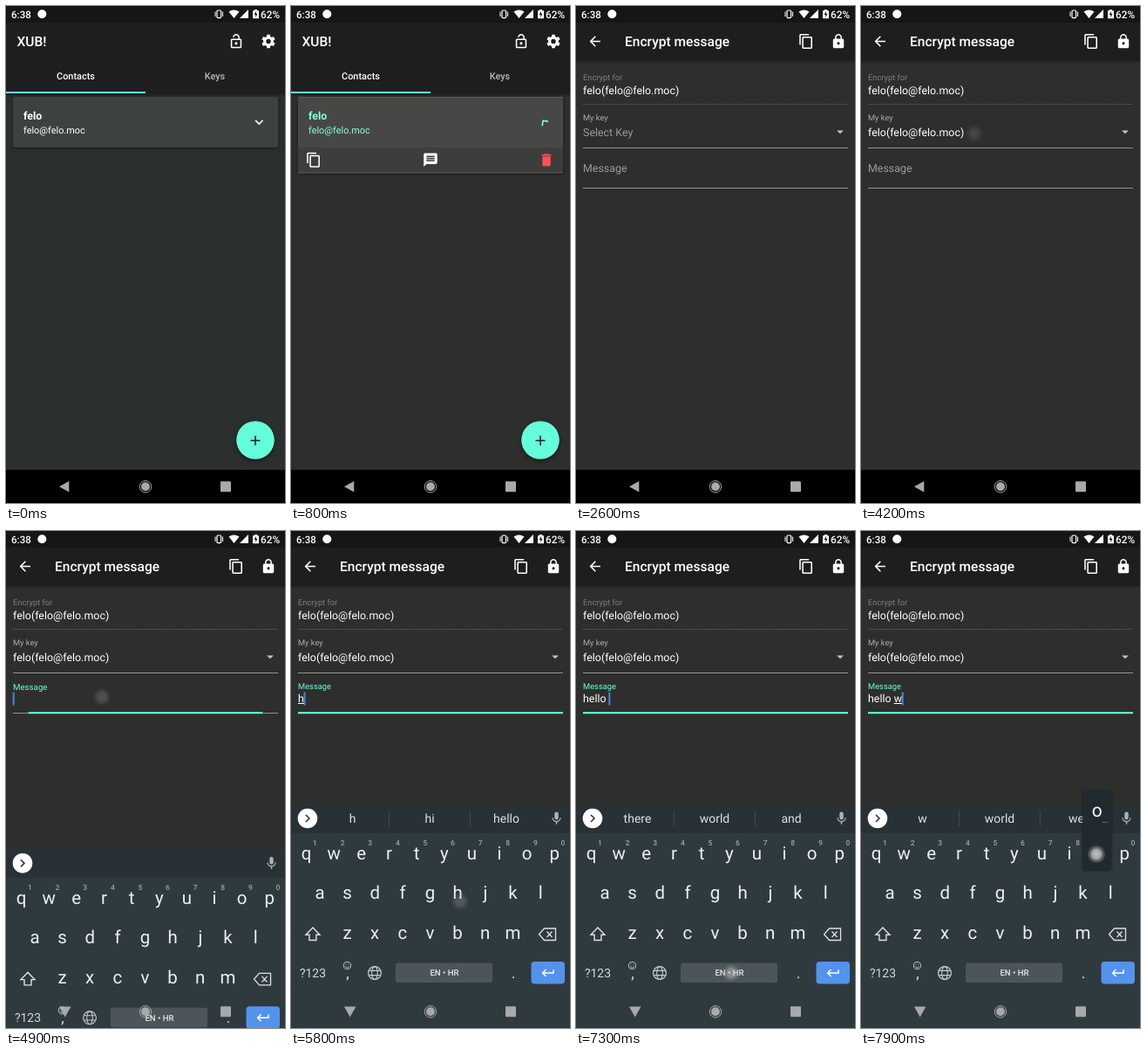
Recreate the animation shown at these times as an HTML page. Size 320x569 px, loop 8 s.

```html
<!DOCTYPE html>
<html lang="en">
<head>
<meta charset="utf-8">
<title>Encrypt message</title>
<style>
  html, body { margin: 0; width: 100%; height: 100%; overflow: hidden; background: #000; }
  svg { display: block; width: 100%; height: 100%; --bg: #2e2f2c; --card: #3d3e3c; --bar: #1e1f1c; }
  text { font-family: Roboto, "Noto Sans", sans-serif; white-space: pre; text-rendering: geometricPrecision; }
  .bg { fill: var(--bg); }
  .bar { fill: var(--bar); }
  .lift { filter: drop-shadow(0 1px 1.5px rgba(0, 0, 0, .5)); }
</style>
</head>
<body>
<svg id="stage" viewBox="0 0 320 569"></svg>
<script>
const ACCENT = '#64ffda', WHITE = '#fff', KEYS_BG = '#2f3a3f';
const NAME = 'felo', MAIL = 'felo@felo.moc', CONTACT = `${NAME}(${MAIL})`;
const LOOP = 8000;

const ICON = {
  copy: 'M16 1H4c-1.1 0-2 .9-2 2v14h2V3h12V1zm3 4H8c-1.1 0-2 .9-2 2v14c0 1.1.9 2 2 2h11c1.1 0 2-.9 2-2V7c0-1.1-.9-2-2-2zm0 16H8V7h11v14z',
  unlocked: 'M12 17c1.1 0 2-.9 2-2s-.9-2-2-2-2 .9-2 2 .9 2 2 2zm6-9h-1V6c0-2.76-2.24-5-5-5S7 3.24 7 6h1.9c0-1.71 1.39-3.1 3.1-3.1s3.1 1.39 3.1 3.1v2H6c-1.1 0-2 .9-2 2v10c0 1.1.9 2 2 2h12c1.1 0 2-.9 2-2V10c0-1.1-.9-2-2-2zm0 12H6V10h12v10z',
  locked: 'M18 8h-1V6c0-2.76-2.24-5-5-5S7 3.24 7 6v2H6c-1.1 0-2 .9-2 2v10c0 1.1.9 2 2 2h12c1.1 0 2-.9 2-2V10c0-1.1-.9-2-2-2zm-6 9c-1.1 0-2-.9-2-2s.9-2 2-2 2 .9 2 2-.9 2-2 2zm3.1-9H8.9V6c0-1.71 1.39-3.1 3.1-3.1s3.1 1.39 3.1 3.1v2z',
  message: 'M20 2H4c-1.1 0-2 .9-2 2v18l4-4h14c1.1 0 2-.9 2-2V4c0-1.1-.9-2-2-2zm-2 12H6v-2h12v2zm0-3H6V9h12v2zm0-3H6V6h12v2z',
  trash: 'M6 19c0 1.1.9 2 2 2h8c1.1 0 2-.9 2-2V7H6v12zM19 4h-3.5l-1-1h-5l-1 1H5v2h14V4z',
  back: 'M20 11H7.83l5.59-5.59L12 4l-8 8 8 8 1.41-1.41L7.83 13H20v-2z',
  drop: 'M7 10l5 5 5-5z',
  mic: 'M12 14c1.66 0 3-1.34 3-3V5c0-1.66-1.34-3-3-3S9 3.34 9 5v6c0 1.66 1.34 3 3 3zm5.3-3c0 3-2.54 5.1-5.3 5.1S6.7 14 6.7 11H5c0 3.41 2.72 6.23 6 6.72V21h2v-3.28c3.28-.48 6-3.3 6-6.72h-1.7z',
  enter: 'M19 7v4H5.83l3.58-3.59L8 6l-6 6 6 6 1.41-1.41L5.83 13H21V7z'
};

const text = (x, y, size, str, fill = WHITE, more = '') =>
  `<text x="${x}" y="${y}" font-size="${size}" fill="${fill}" ${more}>${str}</text>`;
const mid = 'text-anchor="middle"', medium = 'font-weight="500"';
const rect = (x, y, w, h, more = '') => `<rect x="${x}" y="${y}" width="${w}" height="${h}" ${more}/>`;
const circle = (x, y, r, more = '') => `<circle cx="${x}" cy="${y}" r="${r}" ${more}/>`;
const path = (d, more = '') => `<path d="${d}" ${more}/>`;
const line = (d, color, width, more = '') => path(d, `fill="none" stroke="${color}" stroke-width="${width}" ${more}`);
const icon = (name, x, y, fill = WHITE, s = .778) =>
  path(ICON[name], `fill="${fill}" transform="translate(${x} ${y}) scale(${s}) translate(-12 -12)"`);

// Key centres by letter
const KEY = {};
[['qwertyuiop', 17.5, 370], ['asdfghjkl', 33, 415], ['zxcvbnm', 64.5, 461]].forEach(([row, x, y]) =>
  [...row].forEach((c, i) => KEY[c] = { x: x + i * 31.65, y }));

function gear(x, y) {
  const teeth = [0, 60, 120, 180, 240, 300].map(a => rect(-2.4, -10, 4.8, 4, `rx=".5" transform="rotate(${a})"`)).join('');
  return `<g fill="#fff" transform="translate(${x} ${y}) scale(.778)">${teeth}` +
    circle(0, 0, 5.6, 'fill="none" stroke="#fff" stroke-width="4.2"') + '</g>';
}

const header = bottom =>
  rect(0, 0, 320, 19, 'fill="#161714"') + rect(0, 19, 320, bottom - 19, 'class="bar"') +
  rect(0, bottom, 320, 4, 'fill="url(#shade)"');

const contactsPage =
  rect(0, 0, 320, 531, 'class="bg"') + header(100) +
  text(12.5, 46, 15.56, 'XUB!', WHITE, medium) +
  icon('unlocked', 264, 40.5) + gear(301, 40.5) +
  text(80, 84, 10.9, 'Contacts', WHITE, `${medium} ${mid}`) +
  text(239.5, 84, 10.9, 'Keys', '#b9bab8', `${medium} ${mid}`) +
  rect(0, 98, 160, 2, `fill="${ACCENT}"`) +
  rect(8, 104, 304, 58, 'id="card" class="lift" rx="2" style="fill:var(--card)"') +
  rect(8, 104, 304, 58, 'id="ink" rx="2" fill="#fff"') +
  line('', '#6a6b69', .8, 'id="edges"') +
  text(20, 130, 12.45, NAME, WHITE, 'id="name" font-weight="700"') +
  text(20, 145.5, 10.9, MAIL, WHITE, 'id="mail"') +
  line('M-4.2 -2.1L0 2.1L4.2 -2.1', WHITE, 1.6, 'id="chevron"') +
  `<g clip-path="url(#fold)"><g id="actions">${icon('copy', 26, 180)}${icon('message', 160, 180)}${icon('trash', 293, 180, '#ff5252')}</g></g>` +
  circle(286, 497, 21.8, `fill="${ACCENT}" style="filter:drop-shadow(0 2px 2px rgba(0,0,0,.5))"`) +
  line('M280.5 497.5h11M286 492v11', '#1c2422', 1.6);

const composePage =
  rect(0, 0, 320, 569, 'class="bg"') + header(62) +
  icon('back', 21.8, 40.5) + text(56, 46, 15.56, 'Encrypt message', WHITE, medium) +
  icon('copy', 264, 40.5) + icon('locked', 301, 40.5) +
  text(8, 85, 9.3, 'Encrypt for', '#7d7e7b') + text(8, 100.5, 12.45, CONTACT) +
  line('M8 112.5H312', '#5c5d5a', 1, 'stroke-dasharray="1 .6"') +
  text(8, 131, 9.3, 'My key', '#a9aaa7') +
  text(8, 148.5, 12.45, 'Select Key', '#9b9c99', 'id="choice"') +
  icon('drop', 303, 144, '#c3c4c1') + line('M8 162.5H312', '#92938f', 1) +
  `<g id="menu">${rect(0, 124, 320, 39.5, 'class="bg"')}${text(12.4, 148.5, 12.45, CONTACT)}</g>` +
  circle(130, 146, 8, 'id="ghost" fill="#292a27" opacity=".6"') +
  `<g id="label">${text(0, 0, 12.45, 'Message', '#9b9c99', 'id="labelText"')}</g>` +
  line('M8 208.5H312', '#92938f', 1) + rect(8, 207.2, 304, 2, `id="focusLine" fill="${ACCENT}"`) +
  rect(0, 184.5, 2, 15, 'id="cursor" fill="#4a83e0"') +
  text(8, 195.5, 12.45, '', WHITE, 'id="typed"') +
  rect(0, 197, 0, 1, 'id="under" fill="#fff"');

const letters = Object.entries(KEY).map(([c, k]) =>
  text(k.x, k.y + 6, 20.5, c, '#eceff0', mid)).join('');
const digits = [...'1234567890'].map((d, i) =>
  text(27.5 + i * 31.6, 360, 8.5, d, '#9aa4a8', `${mid} ${medium}`)).join('');

const keyboard =
  rect(0, 313, 320, 256, `fill="${KEYS_BG}"`) + rect(0, 313, 320, 33, 'fill="#283135"') +
  circle(19, 329, 11.3, 'fill="#fff"') + line('M17 325L21 329L17 333', '#303a3e', 1.6) +
  '<g id="words">' + line('M112.5 320V338M205.5 320V338', '#3f494d', 1) +
  [70.5, 159, 247].map((x, i) => text(x, 334, 14, '', '#dde2e3', `id="word${i}" ${mid}`)).join('') + '</g>' +
  icon('mic', 304.5, 329, '#aab2b5', .74) + digits + letters +
  line('M25 454L33 462.3H29V468.5H21V462.3H17Z', '#dde2e3', 1.4) +
  line('M290.5 455H303.5V468.5H290.5L284.5 461.7ZM293.5 458.5L299.5 465M299.5 458.5L293.5 465', '#dde2e3', 1.3) +
  text(25, 510.5, 14, '?123', '#d2d8da', mid) + text(65, 511.5, 18, ',', '#d2d8da', mid) +
  circle(64.5, 497.5, 4.1, 'fill="none" stroke="#c3cacd"') +
  line('M62 498.5Q64.5 501.5 67 498.5M63 495.6v1M66 495.6v1', '#c3cacd', .9) +
  circle(96, 506, 7.4, 'fill="none" stroke="#c3cacd" stroke-width="1.2"') +
  '<ellipse cx="96" cy="506" rx="3.3" ry="7.4" fill="none" stroke="#c3cacd" stroke-width="1.1"/>' +
  line('M89.3 503.4H102.7M89.3 508.6H102.7', '#c3cacd', 1.1) +
  rect(120, 494.5, 111, 22.5, 'id="space" rx="2.5" fill="#4c565a"') +
  text(176, 509.3, 9.6, 'EN • HR', '#e4e8e9', `${mid} ${medium}`) +
  text(255, 511.5, 18, '.', '#d2d8da', mid) +
  rect(275.5, 493, 38.5, 25.5, 'rx="4" fill="#5393ec"') + icon('enter', 295, 506, WHITE, .75) +
  `<g id="popup">${rect(-16.5, -74, 33, 92, 'rx="3" fill="#212b2f" class="lift"')}` +
  text(0, -43, 21, '', WHITE, `id="popKey" ${mid}`) + text(9, -36, 9, '...', '#dde2e3', `id="popMore" ${mid}`) + '</g>';

const statusBar =
  text(6, 13.7, 11.6, '6:38', WHITE, medium) + circle(41.3, 9.3, 5, 'fill="#fff"') +
  rect(242, 5, 4.6, 8.6, 'rx="1" fill="none" stroke="#fff" stroke-width="1.2"') +
  line('M240 6.5v5.6M248.6 6.5v5.6', WHITE, 1) +
  path('M261.5 14L255.5 6.6Q261.5 2.4 267.5 6.6Z', 'fill="#fff"') +
  path('M278 4V14H268Z', 'fill="#fff"') +
  path('M285 4h3v1.2h2v9h-7v-9h2z', 'fill="#fff"') + path('M287 6l-2.3 4h1.6v3l2.2-4h-1.5z', 'fill="#161714"') +
  text(292, 13.7, 11.8, '62%', WHITE, medium);

const navBar = '<g fill="#a8a9a9">' + path('', 'id="navBack"') + circle(160, 550.3, 5) +
  circle(160, 550.3, 6.7, 'fill="none" stroke="#a8a9a9" stroke-width="1"') +
  rect(246, 544.3, 12, 12, 'rx="1"') + '</g>';

const stage = document.getElementById('stage');
stage.innerHTML = `<defs>
  <linearGradient id="shade" x2="0" y2="1"><stop stop-opacity=".35"/><stop offset="1" stop-opacity="0"/></linearGradient>
  <radialGradient id="glow"><stop stop-color="#ddd" stop-opacity=".85"/><stop offset=".5" stop-color="#ccc" stop-opacity=".75"/>
    <stop offset=".72" stop-color="#999" stop-opacity=".5"/><stop offset=".9" stop-color="#888" stop-opacity=".3"/>
    <stop offset="1" stop-color="#888" stop-opacity="0"/></radialGradient>
  <clipPath id="fold">${rect(8, 162, 304, 0, 'id="foldRect"')}</clipPath></defs>
  ${contactsPage}<g id="compose">${composePage}</g>
  ${rect(0, 531, 320, 38)}<g id="keyboard">${keyboard}</g>${statusBar}${navBar}
  ${circle(0, 0, 10.5, 'id="touch" fill="url(#glow)"')}`;

const el = {};
stage.querySelectorAll('[id]').forEach(n => el[n.id] = n);
const set = (id, attrs) => { for (const k in attrs) el[id].setAttribute(k, attrs[k]); };
const show = (id, on) => el[id].setAttribute('display', on ? 'inline' : 'none');
const clamp = v => Math.max(0, Math.min(1, v));
const span = (t, a, b) => clamp((t - a) / (b - a));
const easeOut = k => 1 - (1 - k) ** 3;
const smooth = k => k * k * (3 - 2 * k);
const mix = (a, b, k) => a + (b - a) * k;
const tint = k => `rgb(${mix(255, 100, k)},255,${mix(255, 218, k)})`;

// [down, up, x, y, key]
const TOUCHES = [
  [500, 620, 165, 137], [2100, 2200, 167, 180], [3200, 3300, 130, 146], [4000, 4080, 130, 146],
  [4700, 4800, 110, 190], [5500, 5700, 194, 424, 'h'], [5900, 6000, 82, 373, 'e'],
  [6100, 6200, 285, 418, 'l'], [6400, 6500, 285, 418, 'l'], [6600, 6700, 266, 372, 'o'],
  [7200, 7300, 178, 506, ' '], [7500, 7600, 50, 373, 'w'], [7800, 8000, 270, 370, 'o']
];
// [time, text, start of the word being composed, suggestions]
const TYPING = [
  [0, '', 0, ''], [5700, 'h', 0, 'h hi hello'], [6000, 'he', 0, 'he hey hello'],
  [6200, 'hel', 0, 'hel help hello'], [6500, 'hell', 0, "hell he'll hello"],
  [6700, 'hello', 0, 'hello hellos Hello'], [7300, 'hello ', 6, 'there world and'],
  [7600, 'hello w', 6, 'w world we']
];
const latest = (list, t) => list.filter(e => e[0] <= t).pop();

function drawContacts(t) {
  const cool = t < 500, k = smooth(span(t, 560, 900)), h = 58 + 37 * k;
  stage.style.setProperty('--bg', cool ? '#2b2f2e' : '#2e2f2c');
  stage.style.setProperty('--card', cool ? '#3d4241' : '#3d3e3c');
  stage.style.setProperty('--bar', cool ? '#1f1f1f' : '#1e1f1c');
  set('card', { height: h });
  set('ink', { opacity: t < 500 ? 0 : .07 * (1 - span(t, 700, 1100)) });
  set('edges', { d: `M8 104.4H312M8 ${103.6 + h}H312`, opacity: k });
  set('name', { fill: tint(k) });
  set('mail', { fill: tint(k) });
  set('chevron', { stroke: tint(k), transform: `translate(290.3 133) rotate(${180 * k})` });
  set('foldRect', { height: h - 58 });
  set('actions', { transform: `translate(0 ${-18.5 * (1 - k)})` });
}

function drawCompose(t) {
  const k = span(t, 2180, 2560);
  show('compose', k > 0);
  set('compose', { opacity: k * (2 - k), transform: `translate(0 ${142 * (1 - easeOut(k))})` });

  const picked = t >= 4000;
  el.choice.textContent = picked ? CONTACT : 'Select Key';
  set('choice', { fill: picked ? WHITE : '#9b9c99' });
  set('menu', { opacity: span(t, 3220, 3480) * (1 - span(t, 4040, 4190)) });
  show('ghost', t >= 4200 && t < 4700);

  const f = smooth(span(t, 4720, 4950));
  set('label', { transform: `translate(8 ${mix(190, 181, f)}) scale(${mix(1, .75, f)})` });
  set('labelText', { fill: f > 0 ? ACCENT : '#9b9c99' });
  set('focusLine', { x: 160 - 152 * f, width: 304 * f });

  const [, str, from, words] = latest(TYPING, t);
  el.typed.textContent = str;
  const width = n => n ? el.typed.getSubStringLength(0, n) : 0;
  const start = 8 + width(from), end = 8 + width(str.length);
  set('under', { x: start, width: end - start });
  set('cursor', { x: end - .3 });
  show('cursor', t >= 4800);
  show('words', words);
  words.split(' ').concat('', '').slice(0, 3).forEach((w, i) => el['word' + i].textContent = w);
}

function drawKeyboard(t) {
  const k = easeOut(span(t, 4760, 5100));
  show('keyboard', k > 0);
  set('keyboard', { transform: `translate(0 ${256 * (1 - k)})` });
  set('navBack', { d: k > .3 ? 'M61 544.5H74.5L67.7 556.5Z' : 'M61 550.3L72.3 544V556.6Z' });
}

function drawTouch(t) {
  const hit = latest(TOUCHES, t);
  const [, up, x, y, key] = hit || [0, -1000, 0, 0];
  const down = t < up, alpha = down ? 1 : .55 * (1 - span(t, up, up + 180));
  set('touch', { cx: x, cy: y, opacity: alpha });
  set('space', { fill: down && key === ' ' ? '#616b6f' : '#4c565a' });
  const at = down && KEY[key];
  show('popup', at);
  if (!at) return;
  set('popup', { transform: `translate(${at.x} ${at.y})` });
  el.popKey.textContent = key;
  show('popMore', 'eol'.includes(key));
}

function draw(t) {
  drawContacts(t);
  drawCompose(t);
  drawKeyboard(t);
  drawTouch(t);
}

const began = performance.now();
function tick() {
  draw((performance.now() - began) % LOOP);
  requestAnimationFrame(tick);
}
tick();
</script>
</body>
</html>
```
